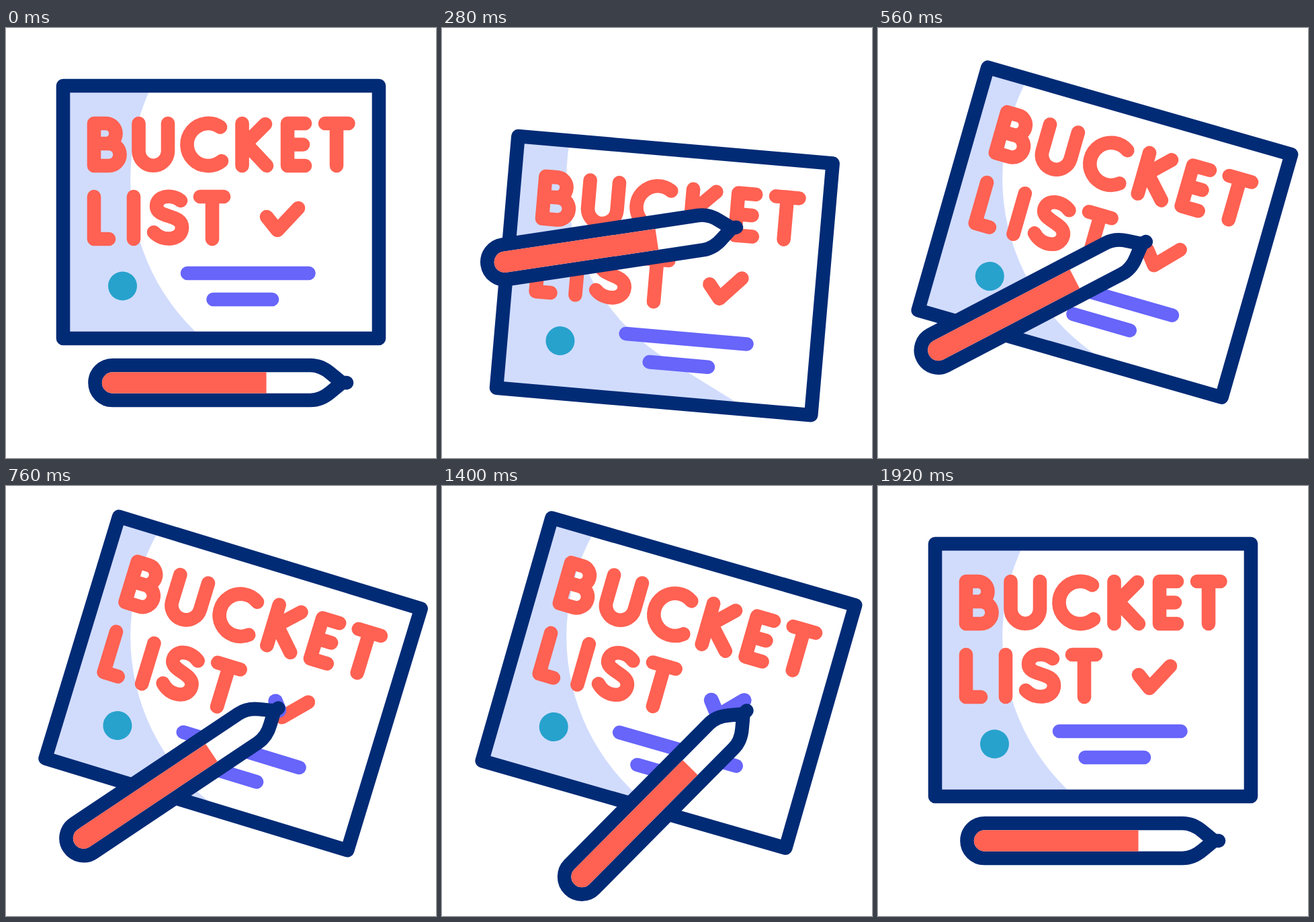
Animation, 640 px wide and 640 px high, one loop 2 s. Source, as an HTML page:

```html
<!DOCTYPE html>
<html lang="en">
<head>
<meta charset="utf-8">
<title>Bucket list</title>
<style>
  html, body { margin: 0; width: 100%; height: 100%; overflow: hidden; background: #fff; }
  svg { display: block; width: 100%; height: 100%; }
  .line { fill: none; stroke-width: 20.6; stroke-linecap: round; stroke-linejoin: round; }
  .navy { stroke: #022b76; }
  .red { stroke: #ff6152; }
  .purple { stroke: #6765fa; }
  #tick { stroke-width: 22; }
</style>
</head>
<body>
<svg viewBox="0 0 640 640" role="img" aria-label="Bucket list">
  <clipPath id="clip"><rect id="window" x="85" y="86" width="470" height="376"/></clipPath>
  <!-- The shade stays put on the stage while the board moves over it. -->
  <path clip-path="url(#clip)" fill="#d1dcfd" d="M0 0H278A317 317 0 0 0 335 493.4L640 682H0Z"/>

  <g id="board">
    <rect class="line navy" x="85" y="86" width="470" height="376"/>
    <g class="line red">
      <path d="M131 142H149A14.5 15 0 0 1 149 172H131M131 172H153A16.5 16.5 0 0 1 153 205H131V142"/>
      <path d="M197.5 142V183a21.75 21.75 0 0 0 43.5 0V142"/>
      <path d="M319 147.5A31.6 31.6 0 1 0 321 198"/>
      <path d="M351.5 142V205M386 143L357 172L388 205"/>
      <path d="M445 142H419V205H445M419 173.5H442"/>
      <path d="M475 142H509.5M492 142V205"/>
      <path d="M131 251V314H153"/>
      <path d="M190 251V314"/>
      <path d="M260 257C246 246 224 250 224 265C224 284 262 276 262 297C262 316 234 319 220 304"/>
      <path d="M289 251H324M307 251V314"/>
      <path d="M388 281L404 301L435 268"/>
    </g>
    <path class="line purple" d="M270 365H450.5M308.5 404H396"/>
    <circle cx="173.5" cy="384" r="21.5" fill="#27a2cd"/>
    <path id="tick" class="line purple" pathLength="1" d="M388 281L404 301L435 268"/>
  </g>

  <g id="pen">
    <path class="line navy" style="fill:#fff" d="M158.5 502H453C466 502 476 508 483 514L500 528L483 542C476 548 466 554 453 554H158.5A26 26 0 0 1 158.5 502ZM500 528H507"/>
    <path fill="#ff6152" d="M387.5 512.3H158.5A15.7 15.7 0 0 0 158.5 543.7H387.5Z"/>
  </g>
</svg>
<script>
  const LOOP = 2000, STEP = 40;
  const CORNER = 0.354; // share of the tick's length before its corner
  const $ = id => document.getElementById(id);

  const ease = (t, from, to) => {
    const u = Math.min(1, Math.max(0, (t - from) / (to - from)));
    return u * u * (3 - 2 * u);
  };
  const mix = (a, b, s) => a.map((v, i) => v + (b[i] - v) * s);

  // Point on the curve that starts and ends at the outer points.
  function bezier(points, s) {
    while (points.length > 1) points = points.slice(1).map((p, i) => mix(points[i], p, s));
    return points[0];
  }

  const boardPath = [[180, 175], [209, 343], [215, 228], [233, 158.5]];
  const penPath = [[507, 528], [400, 82], [400, 361], [398.5, 313]];

  function place(id, [x, y], angle, [homeX, homeY]) {
    $(id).setAttribute('transform', `translate(${x} ${y}) rotate(${angle}) translate(${-homeX} ${-homeY})`);
  }

  function draw(t) {
    const lift = ease(t, 80, 640), down = ease(t, 640, 860), up = ease(t, 860, 1080);
    const boardBack = ease(t, 1320, 1890), penBack = ease(t, 1320, 1850);

    const boardHome = boardPath[0], penHome = penPath[0];
    const boardAt = mix(bezier(boardPath, lift), boardHome, boardBack);
    const boardAngle = 16.93 * (lift - boardBack);
    place('board', boardAt, boardAngle, boardHome);
    place('window', boardAt, boardAngle, boardHome);

    const [x, y] = bezier(penPath, lift);
    const tip = [x + 12 * down + 39.5 * up, y + 31 * down - 22.5 * up];
    const penAngle = -(29.2 * lift + 8 * down + 11 * up) * (1 - penBack);
    place('pen', mix(tip, penHome, penBack), penAngle, penHome);

    const end = CORNER * down + (1 - CORNER) * up, start = ease(t, 1420, 1870);
    const tick = $('tick');
    tick.style.display = end > start ? '' : 'none';
    tick.setAttribute('stroke-dasharray', `${end - start} 2`);
    tick.setAttribute('stroke-dashoffset', -start);
  }

  const begin = performance.now();
  function frame() {
    const t = (performance.now() - begin) % LOOP;
    draw(t - t % STEP);
    requestAnimationFrame(frame);
  }
  frame();
</script>
</body>
</html>
```
